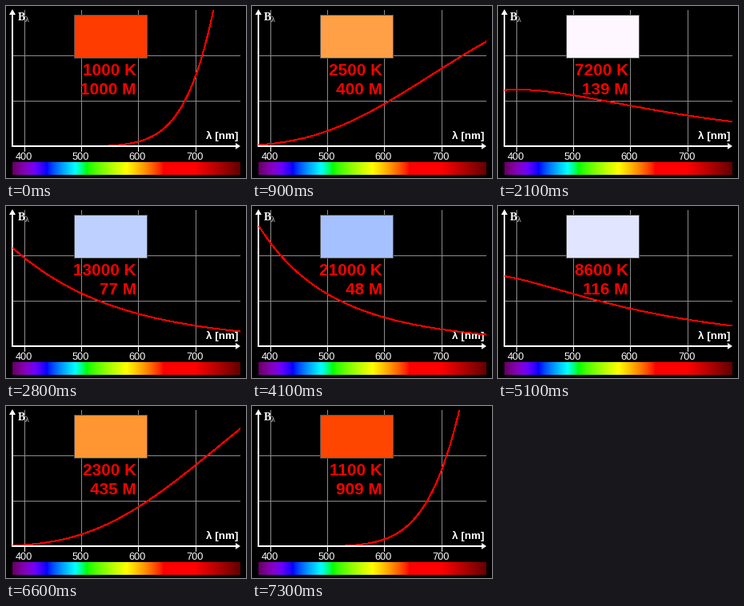
A matplotlib script for the animation above (7400 ms loop, 300 px wide and 216 px high).

```python
import numpy as np
import matplotlib.pyplot as plt
from matplotlib.animation import FuncAnimation
from matplotlib.patches import Polygon, Rectangle

W, H, DPI = 300, 216, 100
X0, X1, BASE, TOP = 8, 293, 176, 5
LO, HI = 380, 780
MEAN_HEIGHT = 53.5
COUNT = 74


def px(size):
    return size * 72 / DPI


def x_of(nm):
    return X0 + (nm - LO) * (X1 - X0) / (HI - LO)


def temperature(i):
    """Near-geometric rise to the half-way frame and back, two digits kept."""
    k = min(i, COUNT - i)
    t = 1000 * np.exp(0.088 * k + 0.123 * np.tanh(k / 6))
    return int(float(f"{t:.2g}"))


def tint(temp):
    """Approximate black-body colour."""
    t = temp / 100
    hot, cool = max(t - 60, 1), max(t - 10, 1)
    r = 403 * hot ** -0.178
    g = min(108 * np.log(t) - 189, 315 * hot ** -0.098)
    b = 138.5 * np.log(cool) - 305
    return np.clip([r, g, b], 0, 255) / 255


def planck(nm, temp):
    """Spectral radiance scaled to a constant mean over the visible band."""
    um = nm / 1000
    b = um ** -5 / np.expm1(14388 / (um * temp))
    return b * MEAN_HEIGHT / b.mean()


def rainbow(nm):
    r = np.interp(nm, [380, 440, 510, 580], [1, 0, 0, 1])
    g = np.interp(nm, [440, 490, 580, 645], [0, 1, 1, 0])
    b = np.interp(nm, [490, 510], [1, 0])
    fade = np.interp(nm, [380, 420, 700, 780], [0.3, 1, 1, 0.3])
    return (np.stack([r, g, b], -1) * fade[:, None]) ** 0.8


fig = plt.figure(figsize=(W / DPI, H / DPI), dpi=DPI, facecolor="black")
ax = fig.add_axes([0, 0, 1, 1])
ax.axis("off")


def line(xs, ys, color="white", width=1, **kw):
    return ax.plot(xs, ys, color=color, lw=px(width), **kw)[0]


def label(x, y, s, size, color="white", **kw):
    kw = {"va": "baseline", "family": "Liberation Sans", "zorder": 4, **kw}
    return ax.text(x, y, s, fontsize=px(size), color=color, **kw)


# Dotted grid
dots = dict(color="#8c8c8c", zorder=1, dash_capstyle="butt",
            linestyle=(0, (1, 1)), antialiased=False)
for nm in range(400, 800, 100):
    x = int(x_of(nm)) + 0.5
    line([x, x], [TOP, BASE], **dots)
    line([x, x], [BASE, 182], zorder=3)
    label(x, 193, str(nm), 12.8, ha="center")
for y in (61.5, 118.5):
    line([X0, X1], [y, y], **dots)

# Axes with arrowheads
line([8, 8], [TOP + 2, BASE], width=2, zorder=3)
line([7, X1 - 3], [BASE, BASE], width=2, zorder=6, solid_capstyle="butt")
for tip in ([(8, 4), (4, 11), (12, 11)], [(293, 176), (287, 172), (287, 180)]):
    ax.add_patch(Polygon(tip, color="white", lw=0, zorder=3))

label(14.5, 18.5, "B", 13.5, family="Liberation Serif", weight="bold")
label(24, 20.5, "λ", 10, family="Liberation Serif")
label(290, 167.5, "λ [nm]", 13.4, ha="right", weight="bold")

# Visible spectrum bar
wave = np.linspace(LO, HI, X1 - X0)
ax.imshow(rainbow(wave)[None], extent=(X0, X1, 212, 196), aspect="auto",
          interpolation="nearest", zorder=2)
ax.set_xlim(0, W)
ax.set_ylim(H, 0)

swatch = Rectangle((84.5, 10.5), 91, 54, lw=px(1), ec="#505050", zorder=4)
ax.add_patch(swatch)

big = dict(size=20.8, color="red", ha="right", weight="bold")
kelvin = label(162.8, 87, "", **big)
mired = label(162.8, 111, "", **big)

nms = np.linspace(LO, HI, 401)
curve = line([], [], color="red", zorder=5, antialiased=False)
window = Rectangle((X0, TOP), X1 - X0, BASE + 1 - TOP, transform=ax.transData)
curve.set_clip_path(window)


def update(i):
    temp = temperature(i)
    curve.set_data(x_of(nms) + 1, BASE + 0.5 - planck(nms, temp))
    swatch.set_facecolor(tint(temp))
    kelvin.set_text(f"{temp} K")
    mired.set_text(f"{round(1e6 / temp)} M")
    return curve, swatch, kelvin, mired


anim = FuncAnimation(fig, update, frames=COUNT, interval=100, repeat=True,
                     repeat_delay=0, init_func=lambda: update(0))
plt.show()
```
